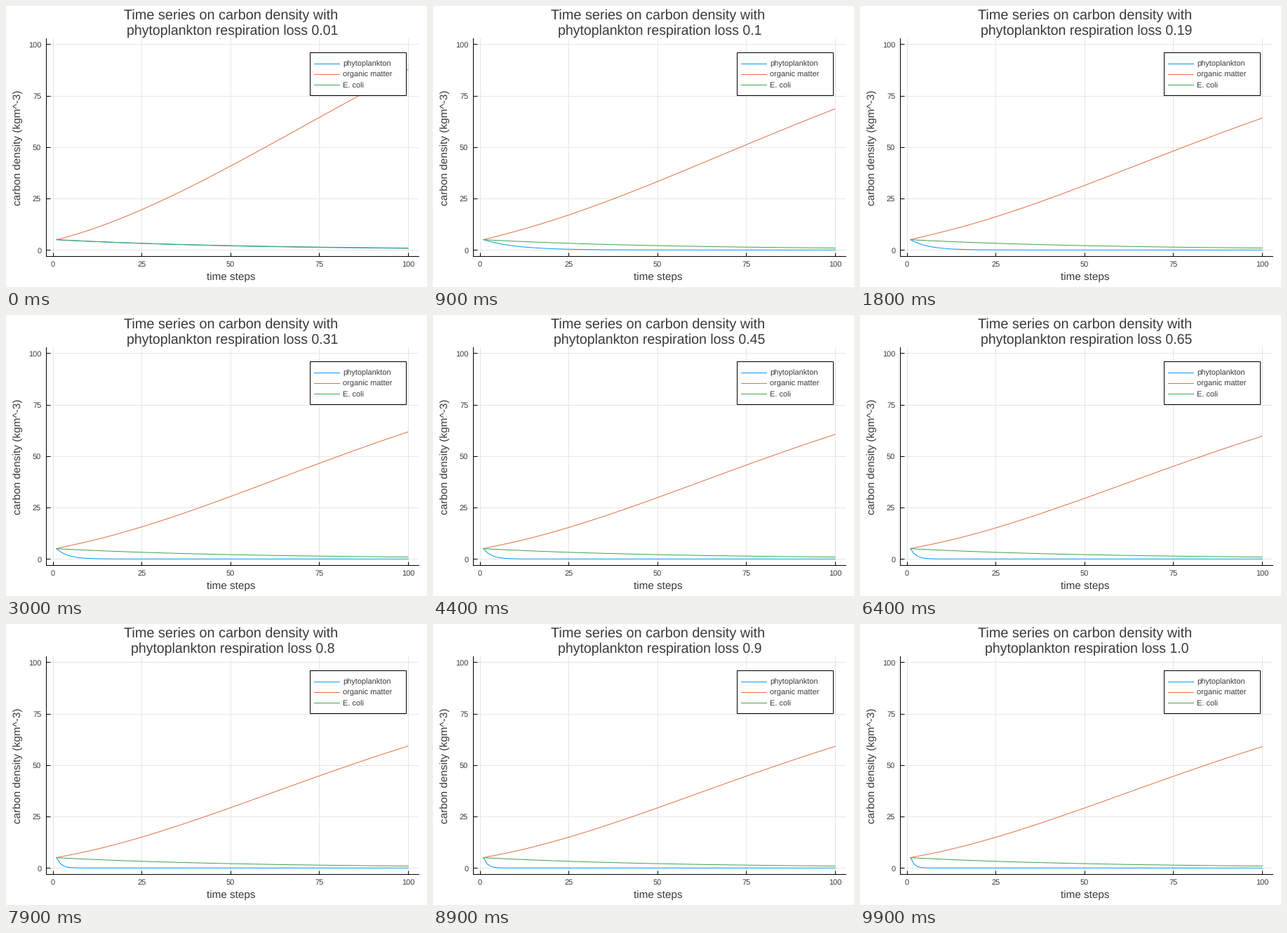
A matplotlib script that plays this animation: 600x400 px, repeating every 10000 ms.

```python
import numpy as np
import matplotlib.pyplot as plt
from matplotlib.animation import FuncAnimation
from matplotlib.patches import Rectangle

W, H = 600, 400
LEFT, RIGHT, TOP, BOTTOM = 57, 588, 45.5, 356.1
PT = 0.72  # points per pixel at 100 dpi
INK = "#3a3a3a"
BLUE, ORANGE, GREEN = "#009afa", "#e26f46", "#3ea44d"
FRAMES = 100

plt.rcParams.update({
    "font.family": "Liberation Sans",
    "text.hinting": "no_hinting",
    "text.color": INK,
})

steps = np.arange(1, 101)
T = steps - 1.0

# Organic matter without any phytoplankton input
KNOTS = [0, 24, 49, 74, 99]
LEVELS = [5, 14.55, 28.6, 43.5, 57.5]
base = np.polyval(np.polyfit(KNOTS, LEVELS, 4), T)
base = (base + np.polyval(np.polyfit(KNOTS, LEVELS, 3, w=[5, 1, 1, 1, 2]), T)) / 2
ecoli = 5 * np.exp(-0.0183 * T + 1.5e-5 * T**2)


def phytoplankton(loss):
    return 5 * np.exp(-(loss + 0.0085) * T)


def organic(loss):
    """Base growth plus the decaying phytoplankton convolved with a quadratic response."""
    k = loss + 0.0085
    sat = 0.0185 / k
    i0 = (1 - np.exp(-k * T)) / k
    i1 = (T - i0) / k
    i2 = (T**2 - 2 * i1) / k
    gain = 0.031 * i0 + (0.0013 + 0.0003 * sat) * i1 + 1.3e-5 * (1 - sat) * i2
    return base + 5 * gain


fig = plt.figure(figsize=(W / 100, H / 100), dpi=100, facecolor="white")

ax = fig.add_axes([LEFT / W, 1 - BOTTOM / H, (RIGHT - LEFT) / W, (BOTTOM - TOP) / H])
ax.set_xlim(1 - 2.97, 100 + 2.97)
ax.set_ylim(-3, 103)
ticks = [0, 25, 50, 75, 100]
ax.set_xticks(ticks)
ax.set_yticks(ticks)
ax.tick_params(direction="in", length=5.5 * PT, width=PT, color="black",
               labelbottom=False, labelleft=False)
ax.grid(color="#e5e5e5", lw=PT)
ax.set_axisbelow(True)
for side in ("top", "right"):
    ax.spines[side].set_visible(False)
for side in ("left", "bottom"):
    ax.spines[side].set(linewidth=PT, color="black")

# Overlay in pixel coordinates for text and legend
px = fig.add_axes([0, 0, 1, 1])
px.set_xlim(0, W)
px.set_ylim(H, 0)
px.axis("off")


def label(x, y, s, size, ha="center", **kw):
    return px.text(x, y, s, fontsize=size * PT, ha=ha, va="baseline", **kw)


def curve(color):
    return ax.plot([], [], color=color, lw=PT, zorder=3)[0]


phyto_line, organic_line, ecoli_line = map(curve, (BLUE, ORANGE, GREEN))
ecoli_line.set_data(steps, ecoli)

label(320.7, 18.5, "Time series on carbon density with", 19.9)
subtitle = label(323, 41, "", 19.55)
label(320.5, 390, "time steps", 15.3)
label(21, 201.8, "carbon density (kgm^-3)", 15.4, rotation=90,
      rotation_mode="anchor")

for v in ticks:
    x = LEFT + (v + 1.97) / 104.94 * (RIGHT - LEFT)
    y = BOTTOM - (v + 3) / 106 * (BOTTOM - TOP)
    label(x, 370.4, str(v), 11)
    label(50.2, y + 4.2, str(v), 11, ha="right")

px.add_patch(Rectangle((433, 66.4), 137, 60.7, fc="white", ec="black", lw=PT))
entries = [("phytoplankton", BLUE), ("organic matter", ORANGE), ("E. coli", GREEN)]
for i, (name, color) in enumerate(entries):
    y = 81.8 + 15.2 * i
    px.plot([439, 475], [y, y], color=color, lw=PT)
    label(480.5, y + 4.2, name, 11, ha="left")


def update(i):
    loss = round((i + 1) / FRAMES, 2)
    phyto_line.set_data(steps, phytoplankton(loss))
    organic_line.set_data(steps, organic(loss))
    subtitle.set_text(f"phytoplankton respiration loss {loss}")
    return phyto_line, organic_line, subtitle


anim = FuncAnimation(fig, update, frames=FRAMES, interval=100, repeat=True,
                     repeat_delay=0, blit=False)
plt.show()
```
